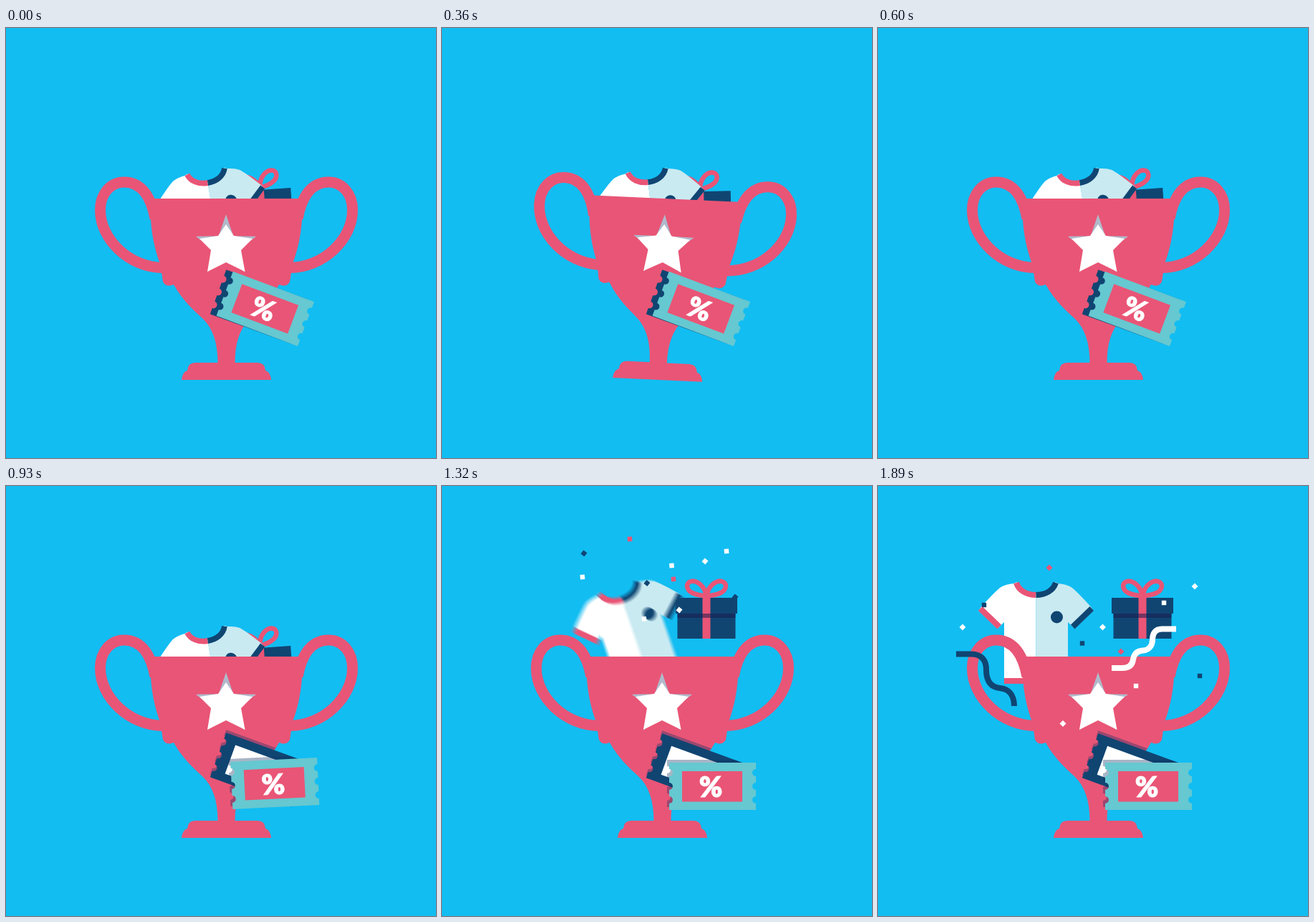
Recreate the animation shown at these times as an HTML page with a canvas. Size 600 by 600 pixels, loop 2.25 s.

```html
<!DOCTYPE html>
<html lang="en">
<head>
<meta charset="utf-8">
<title>Prize cup</title>
<style>
  html, body { margin: 0; width: 100%; height: 100%; overflow: hidden; background: #12bdf2; }
  canvas { display: block; }
</style>
</head>
<body>
<canvas id="stage" width="600" height="600"></canvas>
<script>
const LOOP = 2250, STEP = 30, SHUTTER = 20, SAMPLES = 6;
const SKY = '#12bdf2', PINK = '#e95576', NAVY = '#104572', TEAL = '#66c8d0',
      PALE = '#c9eaf1', WHITE = '#fff', SHADE = 'rgba(16,50,100,.36)';

const out = document.getElementById('stage').getContext('2d');
const layer = document.createElement('canvas');
layer.width = layer.height = 600;
const c = layer.getContext('2d');

// Eased value between [time, value] keys.
function at(t, ...keys) {
  if (t <= keys[0][0]) return keys[0][1];
  for (let i = 1; i < keys.length; i++) {
    const [t0, a] = keys[i - 1], [t1, b] = keys[i];
    if (t < t1) return a + (b - a) * (1 - Math.cos(Math.PI * (t - t0) / (t1 - t0))) / 2;
  }
  return keys[keys.length - 1][1];
}

const shape = d => new Path2D(d);
const fill = (path, color) => { c.fillStyle = color; c.fill(path); };
const rect = (x, y, w, h, color) => { c.fillStyle = color; c.fillRect(x, y, w, h); };
function stroke(path, color, width) {
  c.strokeStyle = color;
  c.lineWidth = width;
  c.stroke(path);
}
function placed(x, y, deg, draw) {
  c.save();
  c.translate(x, y);
  c.rotate(deg * Math.PI / 180);
  draw();
  c.restore();
}
function mirrored(axis, draw) {
  draw();
  c.save();
  c.translate(2 * axis, 0);
  c.scale(-1, 1);
  draw();
  c.restore();
}

const cup = shape(`M201 238 H414 C414 290 406 312 398 335 L398 341 L396 354 Q393 360 386 359.5 L381 358
  C368 381 353 394 341 405 C326 419 319.5 440 319.5 467 H351 Q361 467 362 478 Q369 480 370 491
  H245 Q246 480 253 478 Q254 467 264 467 H295.5 C295.5 440 289 419 274 405 C262 394 247 381 234 358
  L229 359.5 Q222 360 219 354 L217 341 L217 335 C209 312 201 290 201 238 Z`);
const handle = shape('M208 266 C201 228 184 215 165 215 C145 215 131.5 232 131.5 254 C131.5 295 172 334 219 334.5');
const starFront = shape('M307 274 L318 290 L344 294 L328 310 L333.5 340 L307 327 L281 340 L286 310 L270 294 L296 290 Z');
const starBack = new Path2D();
for (let i = 0; i < 10; i++) {
  const r = i % 2 ? 17.5 : 44.4, a = (i / 5 - .5) * Math.PI;
  starBack.lineTo(307 + r * Math.cos(a), 304.5 + r * Math.sin(a));
}

function drawCup() {
  mirrored(307.5, () => stroke(handle, PINK, 15));
  fill(cup, PINK);
  fill(starBack, '#b0b9cb');
  fill(starFront, WHITE);
}

const halfShirt = shape('M0 14 Q23 13 27 -2 L31 0 Q42 1 49 5 Q56 10 76 32 L80 38 L54 63 L44.5 54 V140 H0 Z');
const halfCollar = shape('M0 16 C13 16 24 10 27.5 -1');
const cuff = shape('M75 32 L80.5 38 L54 63.5 L48.5 57.5 Z');
const badge = shape('M20.5 47 a8.5 8.5 0 1 0 17 0 a8.5 8.5 0 1 0 -17 0');

function drawShirt(t) {
  const half = (main, trim) => {
    fill(halfShirt, main);
    rect(0, 132, 44.5, 8, trim);
    fill(cuff, trim);
    stroke(halfCollar, trim, 8);
  };
  const x = at(t, [1150, 279], [1470, 220.5]);
  const y = at(t, [1020, 201], [1440, 130], [1500, 130], [1710, 136]);
  const deg = at(t, [1020, -9.5], [1260, -20], [1650, 0]);
  const size = at(t, [1020, .96], [1260, 1]);
  placed(x, y, deg, () => {
    c.scale(size, size);
    c.save();
    c.scale(-1, 1);
    half(WHITE, PINK);
    c.restore();
    half(PALE, NAVY);
    fill(badge, NAVY);
  });
}

// Origin at the knot of the bow.
const loop = shape('M0 1 C-3 -14 -14 -20 -21 -19 C-30 -17 -28 -7 -20 -3 C-14 0 -7 1 0 1');
function drawGift(t) {
  const low = at(t, [1010, 1], [1270, 0]);
  placed(369 - 15 * low, 152 + 70 * low, -4 * low, () => {
    rect(-43, 4, 86, 22, NAVY);
    rect(-40.5, 26, 81, 35, NAVY);
    rect(-5.5, 1, 11, 60, PINK);
    rect(-40.5, 26, 81, 6, 'rgba(26,28,80,.55)');
    placed(0, 0, -10 * low, () => mirrored(0, () => stroke(loop, PINK, 6.5)));
  });
}

const ticket = new Path2D();
ticket.moveTo(-60.5, -33);
ticket.lineTo(60.5, -33);
for (const y of [-19, 0, 19]) ticket.arc(60.5, y, 5, -Math.PI / 2, Math.PI / 2, true);
ticket.lineTo(60.5, 33);
ticket.lineTo(-60.5, 33);
for (const y of [19, 0, -19]) ticket.arc(-60.5, y, 5, Math.PI / 2, -Math.PI / 2, true);
ticket.closePath();

function drawTickets(t) {
  const move = at(t, [705, 0], [1005, 1]);
  const turn = at(t, [705, 20.5], [915, -2.9], [1080, 0]);
  const back = [352.9, 389 + 8 * move, 20];
  const front = [361.8 + 15.7 * move, 391.8 + 27.2 * move, turn];
  const shadow = ([x, y, deg], dx, dy) => {
    c.globalAlpha = Math.min(1, move * 1.2);
    placed(x + dx, y + dy, deg, () => fill(ticket, SHADE));
    c.globalAlpha = 1;
  };
  c.save();
  c.clip(cup);
  shadow(back, 0, -4);
  shadow(front, -3, -4);
  c.restore();

  placed(...back, () => {
    fill(ticket, NAVY);
    rect(-42.5, -21, 84, 42.5, WHITE);
  });
  c.save();
  const edge = new Path2D();
  edge.addPath(ticket, new DOMMatrix().translate(back[0], back[1]).rotate(back[2]));
  c.clip(edge);
  shadow(front, -3, -4);
  c.restore();

  placed(...front, () => {
    fill(ticket, TEAL);
    rect(-42.5, -21, 84, 42.5, PINK);
    c.fillStyle = c.strokeStyle = WHITE;
    c.lineWidth = 1;
    c.font = '900 39px Lato, sans-serif';
    c.textAlign = 'center';
    c.fillText('%', -2.5, 15);
    c.strokeText('%', -2.5, 15);
  });
}

// Resting x, y, fall dx, dy, colour, resting angle.
const confetti = [
  [239, 114, -23, 40, PINK, 45], [148, 166, -50, 72, NAVY, 0], [118, 197, -78, 70, WHITE, 45],
  [313.5, 197, -7, 86, WHITE, 45], [399, 163, 32, 58, WHITE, 0], [442, 140, 45, 49, WHITE, 45],
  [339, 231, 16, 101, PINK, 45], [285, 219.5, -1, 84, NAVY, 0], [449, 265, 40, 110, NAVY, 0],
  [360, 279, 29, 106, WHITE, 0], [258, 331.5, -24, 146, WHITE, 45]
];
const APEX = 1184;

function drawConfetti(t) {
  if (t < 1020) return;
  const left = ((1740 - Math.min(1740, Math.max(t, APEX))) / 420) ** 2;
  const rise = 1 - (1 - Math.min(1, (t - 1020) / (APEX - 1020))) ** 2;
  for (const [x, y, dx, dy, color, deg] of confetti) {
    const px = x - dx * left, py = y - dy * left;
    placed(305 + (px - 305) * rise, 250 + (py - 250) * rise, deg + 40 * left,
      () => rect(-3.2, -3.2, 6.4, 6.4, color));
  }
}

const navyRibbon = shape('M109 234.5 H130 C145 234.5 151 244 151 256 C151 275 160 281 170 282 C182 283 190 291 190 307');
const whiteRibbon = shape('M416 199.5 H396 C386 199.5 383 207 383 214 C383 224 377 229 370 229.5 C360 230 357 236 356 242 C355 250 350 254 341 254 H326');

function drawRibbon(path, color, start, t) {
  const p = Math.min(1, (t - start) / 390);
  if (p <= 0) return;
  c.setLineDash([p * 132, 400]);
  stroke(path, color, 8);
  c.setLineDash([]);
}

function drawScene(t, shirtTime) {
  rect(0, 0, 600, 600, SKY);
  const rock = at(t, [185, 0], [335, 3.1], [480, -3.1], [600, 0]);
  placed(307.5, 344, rock, () => {
    c.translate(-307.5, -344);
    drawGift(t);
    drawShirt(shirtTime);
    if (t < APEX) drawConfetti(t);
    drawCup();
  });
  drawTickets(t);
  if (t >= APEX) drawConfetti(t);
  drawRibbon(navyRibbon, NAVY, 1320, t);
  drawRibbon(whiteRibbon, WHITE, 1500, t);
}

// The shirt alone gets motion blur, averaged over a few moments.
function render(t) {
  const n = t >= 1020 && t <= 1710 ? SAMPLES : 1;
  for (let i = 0; i < n; i++) {
    drawScene(t, n > 1 ? t + SHUTTER * (i / (n - 1) - .5) : t);
    out.globalAlpha = 1 / (i + 1);
    out.drawImage(layer, 0, 0);
  }
}

const begin = performance.now();
let shown = -1;
function tick() {
  const t = Math.floor((performance.now() - begin) % LOOP / STEP) * STEP;
  if (t !== shown) render(shown = t);
  requestAnimationFrame(tick);
}
tick();
</script>
</body>
</html>
```
